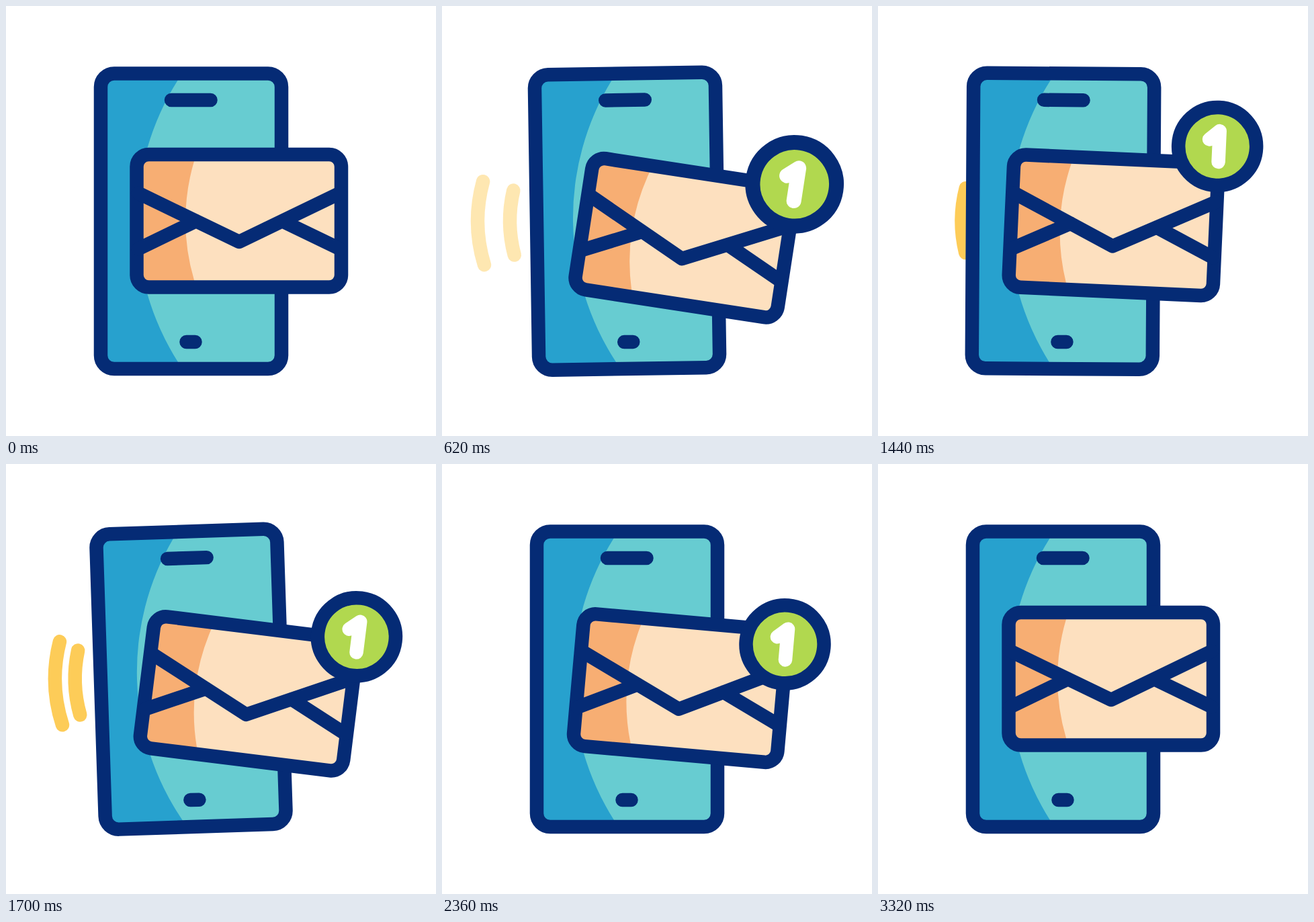
Animation, 640 px wide and 640 px high, one loop 3600 ms. Source, as an HTML page:

```html
<!DOCTYPE html>
<html lang="en">
<head>
<meta charset="utf-8">
<title>New message</title>
<style>
  html, body { margin: 0; height: 100%; overflow: hidden; background: #fff; }
  svg { display: block; width: 100vw; height: 100vh; }
  .line, .wave { fill: none; stroke: #052b75; stroke-width: 20.5; stroke-linecap: round; stroke-linejoin: round; }
  .wave { stroke: #fdcc58; }
</style>
</head>
<body>
<svg viewBox="0 0 640 640">
  <g id="phone">
    <path id="outer" class="wave" d="M62 258Q44 320 62 382"/>
    <path id="inner" class="wave" d="M107 272Q95 320 107 368"/>
    <rect x="141" y="100.5" width="269" height="439.5" rx="20" fill="#67ccd1"/>
    <path d="M146 105H259L256 110A392 392 0 0 0 256 530L259 535H146Z" fill="#27a1ce"/>
    <rect class="line" x="141" y="100.5" width="269" height="439.5" rx="20"/>
    <path class="line" d="M246 140H304.5M268.5 500H281.5"/>
    <g id="mail">
      <rect x="194.5" y="221" width="304.5" height="197.5" rx="18" fill="#fde0bf"/>
      <path d="M200 226H281L280 231A311 311 0 0 0 280 408L281 413H200Z" fill="#f7ae73"/>
      <rect class="line" x="194.5" y="221" width="304.5" height="197.5" rx="18"/>
      <path class="line" d="M197 278.6L347 351L497 278.6M197 361.4L283 320M497 361.4L411 320"/>
      <g id="badge">
        <circle class="line" r="58" style="fill:#b1d84f"/>
        <path class="line" d="M-12.5 -10L2.5 -23V23" style="stroke:#fff"/>
      </g>
    </g>
  </g>
</svg>
<script>
  const LOOP = 3600, RING = 1305;
  const [phone, mail, badge, outer, inner] =
    ['phone', 'mail', 'badge', 'outer', 'inner'].map(id => document.getElementById(id));

  const clamp = v => Math.min(1, Math.max(0, v));
  const ease = u => (1 - Math.cos(Math.PI * clamp(u))) / 2;
  // Smooth hill of height 1, zero beyond `reach` from its peak.
  const hill = (t, peak, reach) => ease(1 - Math.abs(t - peak) / reach);

  // Two full turns of the mail, a small lift, then a last half swing.
  const tilt = t => 9.6 * hill(t, 615, 610) + 10 * hill(t, 1640, 290)
    - 2.8 * hill(t, 2050, 190) + 5.1 * hill(t, 2370, 190);
  const badgeY = t => 216 - 54 * hill(t, 1215, 390) + 25 * hill(t, 2360, 500);
  const pop = age => ease(age / 160) + 0.15 * hill(age, 160, 160);

  function shake(t) {
    const turns = (t - 96) / 334;
    return turns > 0 && turns < 6 ? 2 * Math.sin(2 * Math.PI * turns) : 0;
  }

  function moveWave(wave, distance, age, opacity) {
    const left = 1 - clamp(age / 490);
    wave.setAttribute('transform', `translate(${distance * left * left} 0)`);
    wave.setAttribute('opacity', opacity);
  }

  function draw(t) {
    phone.setAttribute('transform', `rotate(${shake(t)} 275 320)`);
    mail.setAttribute('transform', `rotate(${tilt(t)} 194.5 418.5)`);
    badge.setAttribute('transform',
      `translate(496 ${badgeY(t)}) scale(${pop(t - 380) * pop(3320 - t)})`);

    const ring = t % RING;
    const opacity = t < 2 * RING ? clamp((649 - ring) / 60) : 0;
    moveWave(inner, 45, ring, opacity);
    moveWave(outer, 95, ring - 130, opacity);
  }

  function tick() {
    draw(performance.now() % LOOP);
    requestAnimationFrame(tick);
  }
  tick();
</script>
</body>
</html>
```
